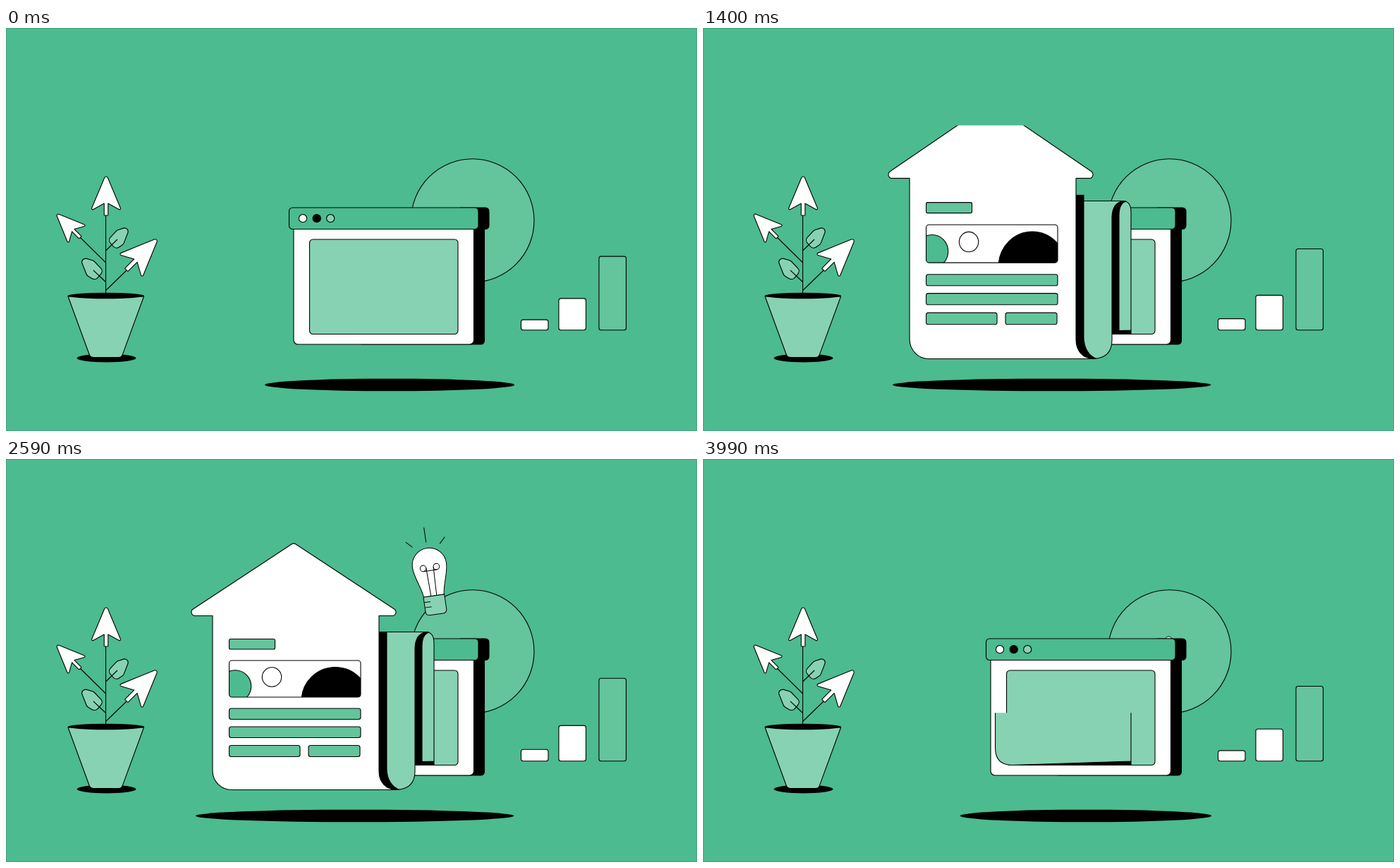
Write an HTML page with a canvas that moves like this. It is 980 by 572 pixels and loops after 4.06 s.

```html
<!DOCTYPE html>
<html lang="en">
<head>
<meta charset="utf-8">
<title>House on a page</title>
<style>
html, body { margin: 0; width: 100%; height: 100%; overflow: hidden; background: #4cbb8f; }
canvas { display: block; width: 980px; height: 572px; }
</style>
</head>
<body>
<canvas id="stage" width="980" height="572"></canvas>
<script>
const ctx = document.getElementById('stage').getContext('2d');
const GREEN = '#4cbb8f', SOFT = '#64c49c', MINT = '#87d2b3', WHITE = '#fff', BLACK = '#000';
const LOOP = 4060, STEP = 70;
const GROUND = 470, SHEET_TOP = 245.5, SHEET_END = 434.5;

const clamp = u => Math.max(0, Math.min(1, u));
const span = (t, a, b) => clamp((t - a) / (b - a));
const smooth = u => u * u * (3 - 2 * u);
const mix = (a, b, u) => a + (b - a) * u;

// Keys are [time, value, value, ...]; values are interpolated linearly.
function track(keys, t) {
  let i = 0;
  while (i < keys.length - 2 && t >= keys[i + 1][0]) i++;
  const a = keys[i], b = keys[i + 1], u = span(t, a[0], b[0]);
  return a.slice(1).map((v, n) => mix(v, b[n + 1], u));
}

function paint(fill, stroke = true) {
  if (fill) { ctx.fillStyle = fill; ctx.fill(); }
  if (stroke) ctx.stroke();
}
function box(x0, y0, x1, y1, r, fill) {
  ctx.beginPath();
  ctx.roundRect(x0, y0, x1 - x0, y1 - y0, r);
  paint(fill);
}
function oval(x, y, rx, ry, fill, stroke = true) {
  ctx.beginPath();
  ctx.ellipse(x, y, rx, ry, 0, 0, 7);
  paint(fill, stroke);
}
function line(...p) {
  ctx.beginPath();
  for (let i = 0; i < p.length; i += 2) ctx.lineTo(p[i], p[i + 1]);
  ctx.stroke();
}
// Closed polygon of [x, y, radius] corners.
function poly(points, fill) {
  const n = points.length, [first, last] = [points[0], points[n - 1]];
  ctx.beginPath();
  ctx.moveTo((first[0] + last[0]) / 2, (first[1] + last[1]) / 2);
  points.forEach(([x, y, r = 0], i) => {
    const next = points[(i + 1) % n];
    ctx.arcTo(x, y, next[0], next[1], r);
  });
  ctx.closePath();
  paint(fill);
}
function clipped(y0, y1, draw) {
  if (y1 <= y0) return;
  ctx.save();
  ctx.beginPath();
  ctx.rect(0, y0, 980, y1 - y0);
  ctx.clip();
  draw();
  ctx.restore();
}
function placed(x, y, angle, sx, sy, draw) {
  ctx.save();
  ctx.translate(x, y);
  ctx.rotate(angle * Math.PI / 180);
  ctx.scale(sx, sy);
  draw();
  ctx.restore();
}

function arrow(x, y, angle, s) {
  placed(x, y, angle, s, s, () => {
    ctx.lineWidth = 1.1 / s;
    poly([[0, -2, 2.5], [22, 50.5, 1.5], [2.8, 40, 0], [2.8, 57, 0.8],
      [-2.8, 57, 0.8], [-2.8, 40, 0], [-22, 50.5, 1.5]], WHITE);
  });
}
function leaf(x, y, sx, sy) {
  placed(x, y, 0, sx, sy, () => {
    poly([[35, -35, 5], [16, -29, 7], [3, -15, 6], [14, -2, 6], [25, -9, 6]], MINT);
    line(0, 0, 16.5, -16);
  });
}
function plant() {
  line(141.5, 265, 141.5, 378);
  line(105, 297, 141.5, 333);
  line(171, 344, 141.5, 372.5);
  leaf(141.5, 316, 1, 1);
  leaf(141.5, 360.5, -1.07, 1.04);
  arrow(142, 209, 0, 1);
  arrow(71.5, 263.5, -45, 0.84);
  arrow(215, 299, 45, 1.1);
  oval(142.5, 468.5, 42, 6, BLACK, false);
  poly([[88, 381], [195.5, 381], [163.8, 467.5, 6], [119.6, 467.5, 6]], MINT);
  oval(141.8, 380, 54.3, 4.2, BLACK, false);
}

function bars(t) {
  const [s] = track([[0, 1], [930, 1.23], [1770, 1], [2080, 1], [3100, 1.245], [4050, 1]], t);
  const bar = (x, h, fill) => box(x, 428.7 - h * s, x + 38.5, 428.7, 3, fill);
  bar(730.5, 14.6, WHITE);
  bar(784, 44.8, WHITE);
  bar(841, 104.6, SOFT);
}

function bulb(t) {
  const [x, y, angle, s] = track([
    [1800, 668, 281, 0, 0], [2100, 641, 242, -12.5, 1], [2240, 592, 218, -25, 1],
    [2310, 575, 200, -25, 1], [2730, 628.5, 230.5, 0, 1], [3710, 628.5, 230.5, 0, 1],
    [4060, 668.5, 281, 0, 0]], t);
  if (s < 0.02) return;
  placed(x, y, angle, s, s, () => {
    ctx.lineWidth = 1 / s;
    ctx.beginPath();
    ctx.moveTo(-14.5, -26.5);
    ctx.bezierCurveTo(-16, -42, -24.3, -56, -24.3, -70.5);
    ctx.arc(0, -70.5, 24.3, Math.PI, 0);
    ctx.bezierCurveTo(24.3, -56, 16, -42, 14.5, -26.5);
    ctx.closePath();
    paint(WHITE);
    box(-15, -26.5, 15, 0, [0, 0, 5, 5], MINT);
    line(-15, -19, -6, -19);
    line(-15, -11.5, -5.5, -11.5);
    oval(-9.5, -67, 4.3, 4.3);
    oval(9.5, -67, 4.3, 4.3);
    line(-9.5, -62.7, 9.5, -62.7);
    line(-5.2, -67, -4, -26.5);
    line(5.2, -67, 4, -26.5);
    if (s > 0.5) {
      line(0, -124.5, 0, -103);
      line(-28.5, -107.5, -20, -99);
      line(27.5, -107, 19, -98.5);
    }
  });
}

function browser() {
  box(500, 270, 678.5, 449, 5, BLACK);
  box(408, 270, 663.5, 449, 6, WHITE);
  box(640, 255, 685, 285.5, 5, BLACK);
  box(401.5, 255, 670, 285.5, 5, GREEN);
  oval(421, 270.2, 5.6, 5.6, WHITE);
  oval(440.7, 270.2, 5.6, 5.6, BLACK);
  oval(460.2, 270.2, 5.6, 5.6, MINT);
  box(430.5, 300, 641, SHEET_END, 5, MINT);
}

function backSheet() {
  poly([[438, SHEET_END], [607, 429], [607, SHEET_END]], BLACK);
  ctx.beginPath();
  ctx.moveTo(414.5, 260);
  ctx.lineTo(414.5, 410);
  ctx.quadraticCurveTo(414.5, 434, 438, SHEET_END);
  ctx.lineTo(607, 429);
  ctx.lineTo(607, 261);
  ctx.quadraticCurveTo(607, SHEET_TOP, 595, SHEET_TOP);
  ctx.lineTo(430, SHEET_TOP);
  paint(MINT);
}

function frontSheet() {
  ctx.beginPath();
  ctx.moveTo(580, SHEET_END);
  ctx.lineTo(580, 268);
  ctx.quadraticCurveTo(581, 247, 597, SHEET_TOP);
  ctx.lineTo(600, 246);
  ctx.quadraticCurveTo(590, 249, 590, 266);
  ctx.lineTo(590, 429.6);
  ctx.lineTo(590, SHEET_END);
  ctx.closePath();
  paint(BLACK);
  ctx.beginPath();
  ctx.moveTo(597, SHEET_TOP);
  ctx.lineTo(400, SHEET_TOP);
  ctx.quadraticCurveTo(387.5, SHEET_TOP, 387.5, 259);
  ctx.lineTo(387.5, 469.5);
  ctx.lineTo(554, 469.5);
  ctx.quadraticCurveTo(580, 468, 580, 443);
  ctx.lineTo(580, 268);
  ctx.quadraticCurveTo(581, 247, 597, SHEET_TOP);
  paint(MINT);
}

function house() {
  // Shaded fold beside the wall
  ctx.beginPath();
  ctx.moveTo(528, 245);
  ctx.lineTo(540.5, 245);
  ctx.lineTo(540.5, 440);
  ctx.quadraticCurveTo(541, 462, 559, 469.5);
  ctx.lineTo(528, 469.5);
  paint(BLACK, false);

  ctx.beginPath();
  ctx.moveTo(400, 124.3);
  ctx.arcTo(408, 119, 565, 222.5, 5);
  ctx.arcTo(565, 222.5, 529, 222.5, 5.15);
  ctx.lineTo(529, 222.5);
  ctx.lineTo(529, 443);
  ctx.bezierCurveTo(529, 458, 538, 469.5, 555, 469.5);
  ctx.arcTo(293, 469.5, 293, 300, 27);
  ctx.lineTo(293, 222.5);
  ctx.arcTo(251, 222.5, 408, 119, 5.15);
  ctx.closePath();
  paint(WHITE);

  box(316.5, 255.5, 381.5, 270, 2, SOFT);
  ctx.save();
  ctx.beginPath();
  ctx.roundRect(316.5, 286, 186.5, 52, 4);
  ctx.clip();
  oval(325, 322.5, 22.7, 22.7, GREEN);
  oval(377, 309.5, 13.7, 13.7, WHITE);
  oval(467, 343.5, 48, 48, BLACK);
  ctx.restore();
  box(316.5, 286, 503, 338, 4);
  box(316.5, 354, 503, 369.5, 3, SOFT);
  box(316.5, 380, 503, 395.5, 3, SOFT);
  box(316.5, 406.5, 417, 422.5, 3, SOFT);
  box(429, 406.5, 502, 422.5, 3, SOFT);
}

function paper(t) {
  const out = t < 2000;
  const backTop = out ? mix(SHEET_END, 244, span(t, 630, 850))
    : mix(244, SHEET_END, span(t, 3790, 4046) ** 2);
  const frontEnd = out ? mix(244, 471, span(t, 850, 1090))
    : mix(471, 244, span(t, 3510, 3790));
  const houseTop = out ? mix(GROUND, 104, span(t, 1110, 1430))
    : mix(104, 469, span(t, 3150, 3500));

  if (backTop < SHEET_END) clipped(backTop, 436, backSheet);
  if (frontEnd > 244) clipped(244, frontEnd, frontSheet);
  if (t > 1110 && t < 3540) {
    const stretch = 1 + 0.144 * (1 - span(t, 1110, 1500));
    clipped(houseTop, 471, () => placed(0, GROUND, 0, 1, stretch, () => {
      ctx.translate(0, -GROUND);
      house();
    }));
  }
}

function shadow(t) {
  const grow = t < 2000 ? smooth(span(t, 775, 1392)) : 1 - smooth(span(t, 2900, 4100));
  const left = mix(367, 269, grow), right = mix(721.3, 720.3, grow);
  oval((left + right) / 2, 506.5, (right - left) / 2, 8.8, BLACK, false);
}

function draw(t) {
  ctx.fillStyle = GREEN;
  ctx.fillRect(0, 0, 980, 572);
  ctx.lineWidth = 1;
  ctx.strokeStyle = 'rgba(0,0,0,.12)';
  ctx.strokeRect(0.5, 0.5, 979, 571);
  ctx.strokeStyle = BLACK;
  ctx.lineWidth = 1.1;
  ctx.lineJoin = 'round';
  plant();
  oval(661.7, 273.3, 87.3, 87.5, SOFT);
  bulb(t);
  browser();
  shadow(t);
  paper(t);
  bars(t);
}

const start = performance.now();
function tick() {
  const t = Math.max(0, performance.now() - start) % LOOP;
  draw(Math.floor(t / STEP) * STEP);
  requestAnimationFrame(tick);
}
tick();
</script>
</body>
</html>
```
